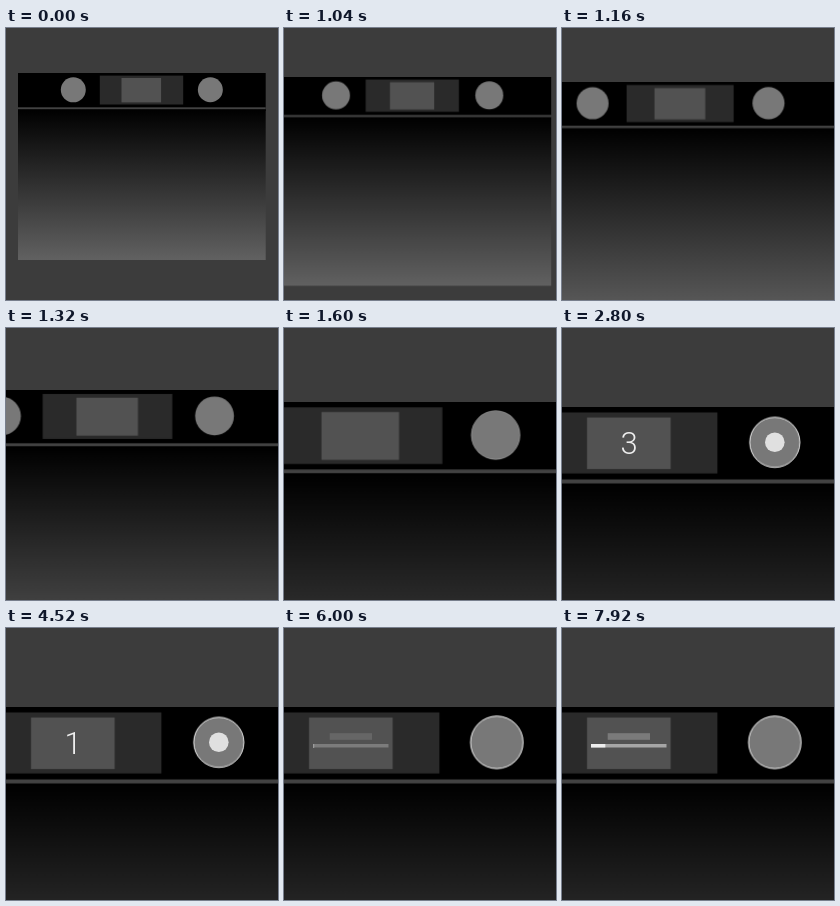
Animation of 272x272 px, one loop 8000 ms. Source, as an HTML page:

```html
<!DOCTYPE html>
<html lang="en">
<head>
<meta charset="utf-8">
<title>Oven timer</title>
<style>
  html, body { margin: 0; width: 100%; height: 100%; overflow: hidden; background: #3c3c3c; }
  svg { display: block; width: 100vw; height: 100vh; }
  #oven { transform-origin: 0 0; }
  #knob, #dot { transform-box: fill-box; transform-origin: center; }
  .digit { font: 300 31px Roboto, sans-serif; fill: #eee; text-anchor: middle; }
  .digit, #dot, #ring, #status { opacity: 0; }
  #fill { transform-box: fill-box; transform-origin: left; }
</style>
</head>
<body>
<svg viewBox="0 0 272 272">
  <defs>
    <linearGradient id="glass" x1="0" y1="0" x2="0" y2="1">
      <stop offset="0" stop-color="#000"/>
      <stop offset="1" stop-color="#616161"/>
    </linearGradient>
  </defs>

  <g id="oven">
    <rect x="12" y="45" width="247.7" height="38" fill="#000"/>
    <rect x="12" y="81.2" width="247.7" height="150.8" fill="url(#glass)"/>
    <rect x="12" y="79.3" width="247.7" height="1.9" fill="#424242"/>
    <rect x="93.8" y="47.6" width="83.4" height="28.9" fill="#2a2a2a"/>
    <rect x="115.5" y="50" width="39.6" height="24.4" fill="#525252"/>
    <circle cx="67.3" cy="61.8" r="12.5" fill="#787878"/>
    <g id="knob">
      <circle cx="204.35" cy="61.75" r="12.5" fill="#787878"/>
      <circle id="ring" cx="204.35" cy="61.75" r="12.4" fill="none" stroke="#eee" stroke-width=".47"/>
    </g>
  </g>

  <circle id="dot" cx="212.8" cy="114.3" r="9.8" fill="#e0e0e0"/>

  <text class="digit" x="67" y="126">3</text>
  <text class="digit" x="67" y="126">2</text>
  <text class="digit" x="67" y="126">1</text>

  <g id="status">
    <rect x="45.7" y="105.2" width="42.3" height="6.6" fill="#7a7a7a"/>
    <rect x="29" y="116" width="75.5" height="3.5" fill="#a6a6a6"/>
    <rect id="fill" x="29" y="116" width="75.5" height="3.5" fill="#eee"/>
  </g>
</svg>

<script>
const LOOP = 8000;
const SMOOTH = 'ease-in-out';
const ZOOM = 'cubic-bezier(.33, 0, .55, 1)';

// steps: [ms, value, easing towards the next step]
function run(el, prop, steps) {
  const last = steps[steps.length - 1];
  const frames = [...steps, [LOOP, last[1]]].map(([ms, value, easing = 'linear']) =>
    ({ offset: ms / LOOP, [prop]: value, easing }));
  el.animate(frames, { duration: LOOP, iterations: Infinity });
}

const $ = id => document.getElementById(id);
const wide = 'translate(0px, 0px) scale(1)';
const close = 'translate(-219.2px, -16.2px) scale(2.114)';

run($('oven'), 'transform', [[0, wide], [840, wide, ZOOM], [1900, close]]);
run($('ring'), 'opacity', [[0, 0], [1480, 0], [1880, 1]]);
run($('knob'), 'transform', [
  [0, 'scale(1)'], [2160, 'scale(1)', SMOOTH], [2480, 'scale(.955)'],
  [5600, 'scale(.955)', SMOOTH], [5880, 'scale(1)']
]);
run($('dot'), 'opacity', [
  [0, 0], [1880, 0], [2180, 1], [5720, 1], [5960, 0]
]);
run($('dot'), 'transform', [
  [0, 'scale(1.13)'], [2160, 'scale(1.13)', SMOOTH], [2480, 'scale(1)'],
  [5600, 'scale(1)', SMOOTH], [5880, 'scale(1.13)']
]);

const ticks = [2520, 3480, 4520, 5600];
document.querySelectorAll('.digit').forEach((el, i) => run(el, 'opacity', [
  [0, 0, 'step-end'], [ticks[i], 1, 'step-end'], [ticks[i + 1], 0]
]));

run($('status'), 'opacity', [[0, 0], [5800, 0], [6200, 1]]);

const barStart = 5820, barRate = 6.9 / 75.5 / 1000;
$('fill').animate([
  { offset: 0, transform: 'scaleX(0)' },
  { offset: barStart / LOOP, transform: 'scaleX(0)' },
  { offset: 1, transform: `scaleX(${(LOOP - barStart) * barRate})` }
], { duration: LOOP, iterations: Infinity });
</script>
</body>
</html>
```
